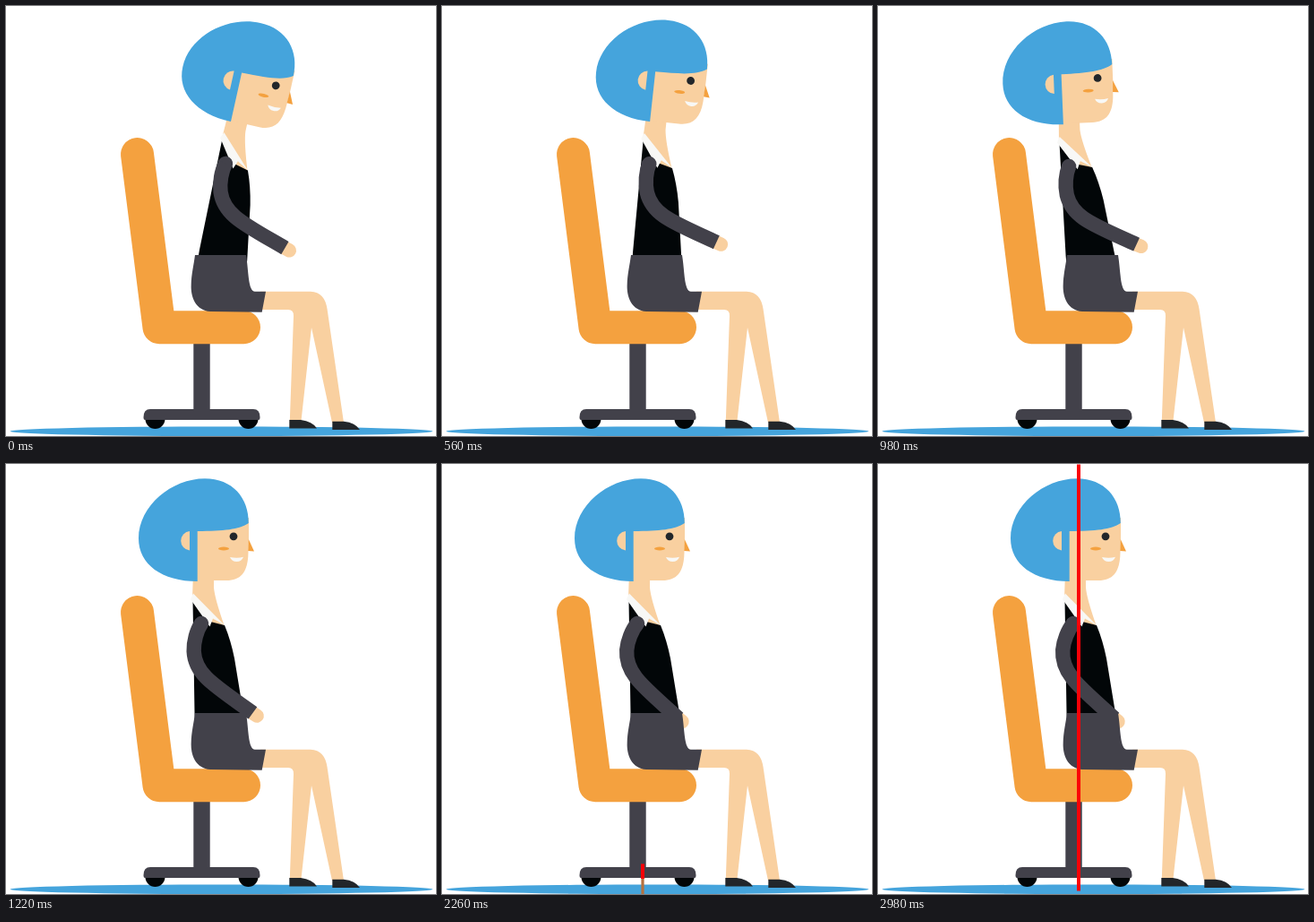
Write an HTML page that moves like this. It is 480 px wide and 480 px high and loops after 6 s.

```html
<!DOCTYPE html>
<html lang="en">
<head>
<meta charset="utf-8">
<title>Sitting upright</title>
<style>
  html, body { margin: 0; width: 100%; height: 100%; overflow: hidden; background: #fff; }
  svg { display: block; width: 100%; height: 100%; }
  .blue { fill: #45a4dc; }
  .skin { fill: #f9d0a0; }
  .orange { fill: #f4a13f; }
  .grey { fill: #42414a; }
  .black { fill: #020608; }
  .ink { fill: #22262a; }
  .white { fill: #f8f8f6; }
  .line { fill: none; }
</style>
</head>
<body>
<svg viewBox="0 0 480 480">
  <ellipse class="blue" cx="240.5" cy="474.8" rx="235.8" ry="5.4"/>

  <!-- chair -->
  <circle class="black" cx="166.5" cy="461" r="11"/>
  <circle class="black" cx="270.5" cy="461" r="11"/>
  <rect class="grey" x="209.3" y="370" width="18.4" height="84"/>
  <path class="grey" d="M155 462Q153.500 462 153.500 459Q153.500 450 161 450H276Q283.500 450 283.500 459Q283.500 462 282 462Z"/>
  <path class="line" stroke="#f4a13f" stroke-width="37" stroke-linecap="round" stroke-linejoin="round" d="M146.500 165.500L171 358.700H265.500"/>

  <!-- legs -->
  <path class="skin" d="M284 318.800H340C351 319 357 327 358.500 338L377 465H364L341 359L329.500 463H316.800L321 346Q321.300 339 315 339H284Z"/>
  <path class="ink" d="M316.300 471.500V462H329Q342 463.500 347 471.500Z"/>
  <path class="ink" d="M364.300 473V463.700H377Q390 465 395 473Z"/>

  <!-- upper body -->
  <g id="body">
    <path class="skin" d="M209 120H232V138Q233 150 243.500 180L226 176L208 150Z"/>
    <path class="black" d="M208.500 152L228 176L244 180Q251 197 255 217L265 278L266 288H211L210.500 278Z"/>
    <path class="white" d="M209 144.500L244 180L231 172.500L227.500 181.500L206 151Z"/>
    <path class="skin" d="M210 60H271V84L270.300 103C269 121 262 130 246 130H210Z"/>
    <path class="orange" d="M270.800 84L277 97.500L270.300 97Z"/>
    <path class="blue" d="M213.700 131C174 131 148 112 148 83C148 47 185 16.300 222 16.300C253 16.300 271 38 270.800 66C260 73.500 243 74.500 213.700 75Z"/>
    <path class="skin" d="M205 75A10.800 10.800 0 0 0 205 96.500Z"/>
    <circle class="ink" cx="254" cy="80.800" r="4.400"/>
    <ellipse class="orange" cx="243" cy="94.500" rx="6" ry="1.900"/>
    <path class="white" d="M250 104Q258 105.500 265 103.800Q263 109 257.500 109Q252 109 250 104Z"/>
    <g id="arm">
      <path class="line" stroke="#f9d0a0" stroke-width="15.400" stroke-linecap="round" d="M299 259.500L304.800 261.400"/>
      <circle class="grey" cx="218" cy="178" r="8.200"/>
      <path class="line" stroke="#42414a" stroke-width="16.400" d="M218 178C215 187 215 200 218 210C226 235 250 241 299.500 259.500"/>
    </g>
  </g>

  <path class="grey" d="M211 278H268C271 296 270 318.700 278 318.700H290L285.700 341.700L228 341C212 340 206 325 206.700 311C207 299 209.500 290 211 278Z"/>

  <!-- plumb line -->
  <rect id="tail" x="222.400" width="3.200" fill="#b5713f"/>
  <rect id="plumb" x="222" width="4" fill="#fb0007"/>
</svg>
<script>
const LOOP = 6000;
const $ = id => document.getElementById(id);
const body = $('body'), arm = $('arm'), plumb = $('plumb'), tail = $('tail');

const span = (t, from, to) => Math.min(1, Math.max(0, (t - from) / (to - from)));
const inOut = (p, n) => p < 0.5 ? (2 * p) ** n / 2 : 1 - (2 - 2 * p) ** n / 2;
const curve = (a, b, u) => 3 * u * (1 - u) ** 2 * a + 3 * u * u * (1 - u) * b + u ** 3;

// Swings past both ends before settling.
function swing(p) {
  if (p <= 0 || p >= 1) return p;
  let lo = 0, hi = 1;
  for (let i = 0; i < 24; i++) {
    const mid = (lo + hi) / 2;
    if (curve(0.51, 0.49, mid) < p) lo = mid; else hi = mid;
  }
  return curve(-1.04, 2.04, lo);
}

function setBar(bar, top, bottom) {
  bar.setAttribute('y', top);
  bar.setAttribute('height', Math.max(0, bottom - top));
}

function draw(t) {
  const lean = 12.5 * (1 - swing(span(t, 0, 1120)));
  const reach = -2.7 + 24.3 * inOut(span(t, 200, 1920), 3);
  body.setAttribute('transform', `rotate(${lean} 241 300)`);
  arm.setAttribute('transform', `rotate(${reach} 218 178)`);

  const top = 480 - 479.5 * inOut(span(t, 1955, 2955), 4);
  const bottom = 463 + 13.5 * span(t, 2280, 2980);
  setBar(plumb, top, bottom);
  setBar(tail, Math.max(top, bottom), 480);
  tail.setAttribute('opacity', 1 - span(t, 2300, 2640));
}

const start = performance.now();
function tick() {
  draw((performance.now() - start) % LOOP);
  requestAnimationFrame(tick);
}
draw(0);
requestAnimationFrame(tick);
</script>
</body>
</html>
```
